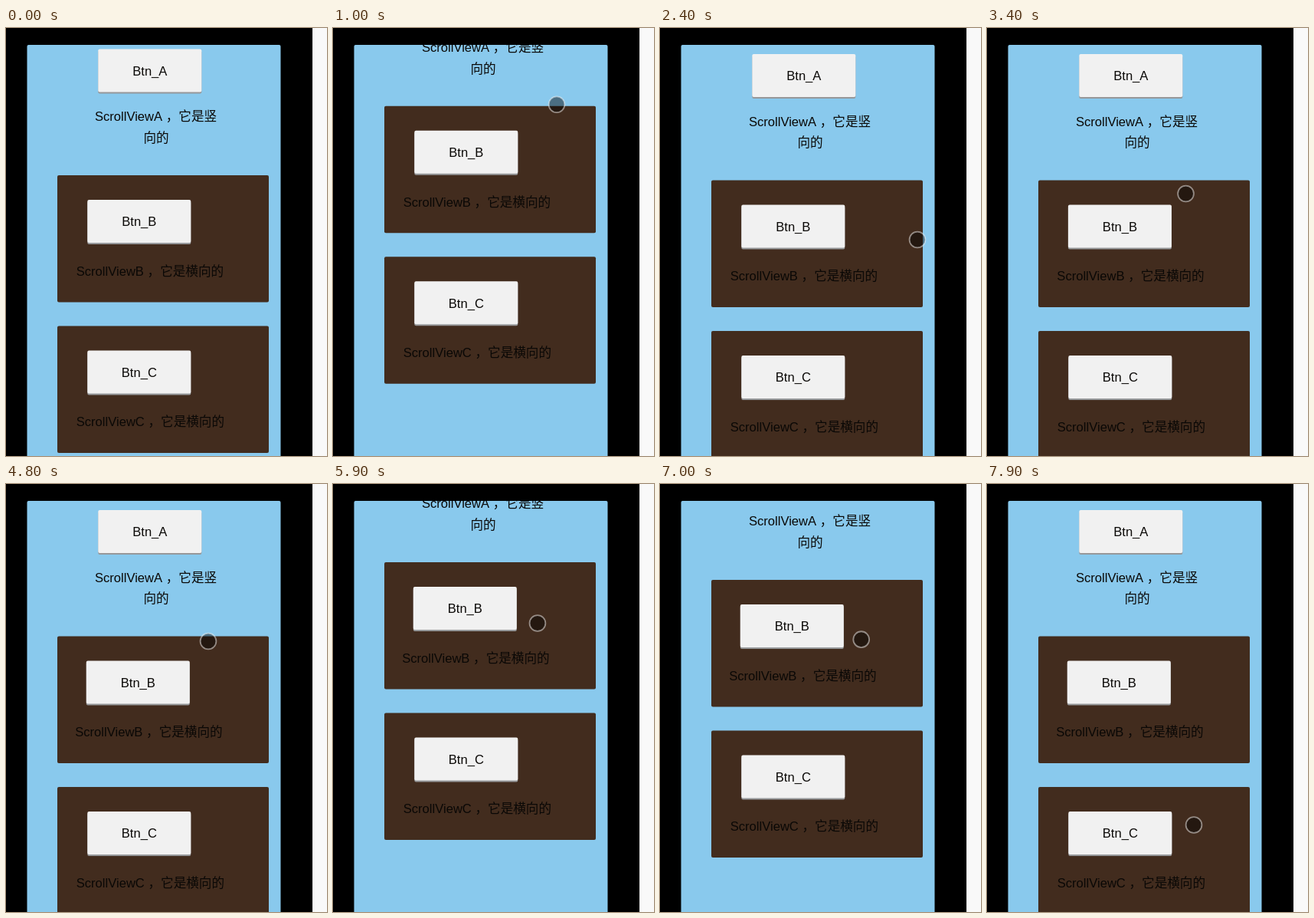
Recreate the animation shown at these times as an HTML page with a canvas. Size 419 by 558 pixels, loop 8000 ms.

```html
<!DOCTYPE html>
<html lang="zh-CN">
<head>
<meta charset="utf-8">
<title>Nested scroll views</title>
<style>
html, body { margin: 0; width: 100%; height: 100%; overflow: hidden; background: #000; }
canvas { display: block; }
</style>
</head>
<body>
<canvas width="419" height="558"></canvas>
<script>
const ctx = document.querySelector('canvas').getContext('2d');
const LOOP = 8000, STEP = 100, REST = 6.5;
const FONT = '"Liberation Sans", "Noto Sans CJK SC", "Noto Sans CJK", sans-serif';
const INK = '#0a0806';

// Pointer glides: [from, to, x, y]
const glides = [
  [300, 600, 292, 190], [1600, 2400, 336, 276], [2500, 3100, 262, 244],
  [3300, 3400, 259.5, 216], [3400, 4200, 266.5, 222], [4200, 4400, 266.5, 166],
  [4700, 4900, 261.5, 244], [4900, 5500, 266, 278], [5600, 6400, 269, 278],
  [6600, 7200, 260.5, 275.5], [7500, 7900, 270, 444.5]
];

const part = (t, a, b) => Math.min(1, Math.max(0, (t - a) / (b - a)));
// Smooth 0 to 1
const ramp = (t, a, b) => { const u = part(t, a, b); return u * u * (3 - 2 * u); };
// Smooth 0 to 1 and back
const arch = (t, a, b) => Math.sin(Math.PI * part(t, a, b)) ** 2;

function pose(t) {
  const drag = -95 * arch(t, 600, 1300) - 101.5 * arch(t, 5600, 6300) - 98 * arch(t, 6600, 7200);
  const pull = 28 * arch(t, 6200, 6600);
  const bounce = 4.5 * (ramp(t, 1200, 1400) - ramp(t, 1600, 1900));
  const swipe = -108 * arch(t, 2500, 3100);
  const wave = arch(t, 3400, 4100);

  let x = 407, y = 240;
  for (const [from, to, px, py] of glides) {
    const u = ramp(t, from, to);
    x += (px - x) * u;
    y += (py - y) * u;
  }
  return {
    scroll: REST * ramp(t, 1100, 1300) + drag + bounce + 0.375 * pull,
    slide: swipe - 1.5 * ramp(t, 3200, 3800),
    x: x + swipe - 168 * wave,
    y: y + drag + pull - 34 * wave - 127 * arch(t, 4900, 5500)
  };
}

function box(x, y, w, h, color, r = 2) {
  ctx.fillStyle = color;
  ctx.beginPath();
  ctx.roundRect(x, y, w, h, r);
  ctx.fill();
}

function text(str, x, y, align = 'left') {
  ctx.font = `16.6px ${FONT}`;
  ctx.textAlign = align;
  ctx.fillStyle = INK;
  ctx.fillText(str, x, y);
}

function button(label, x, y) {
  box(x, y + 2, 135, 56, '#96989a');
  box(x, y, 135, 56, '#f1f1f1');
  text(label, x + 67.5, y + 34.3, 'center');
}

function innerView(name, y, dx) {
  ctx.save();
  box(67, y, 276, 165.5, '#422c1e');
  ctx.clip();
  button('Btn_' + name, 106.3 + dx, y + 32);
  text(`ScrollView${name} ，它是横向的`, 91.7 + dx, y + 130.8);
  ctx.restore();
}

function pointer(x, y) {
  ctx.beginPath();
  ctx.arc(x, y, 10.4, 0, 7);
  ctx.fillStyle = 'rgba(0,0,0,.45)';
  ctx.fill();
  ctx.strokeStyle = 'rgba(255,255,255,.47)';
  ctx.lineWidth = 1.8;
  ctx.stroke();
}

function draw(t) {
  const { scroll, slide, x, y } = pose(t);
  box(0, 0, 419, 558, '#000', 0);
  box(400, 0, 19, 558, '#f9f9f9', 0);
  ctx.save();
  box(27.5, 22, 331, 560, '#89c9ed');
  ctx.clip();
  button('Btn_A', 120.3, 27.5 + scroll);
  text('ScrollViewA ，它是竖', 115.9, 121.2 + scroll);
  text('向的', 196, 148.8 + scroll, 'center');
  innerView('B', 192 + scroll, slide);
  innerView('C', 388.5 + scroll, 0);
  ctx.restore();
  if (t >= 300) pointer(x, y);
}

function frame() {
  const t = performance.now() % LOOP;
  draw(Math.floor(t / STEP) * STEP);
  requestAnimationFrame(frame);
}
frame();
</script>
</body>
</html>
```
